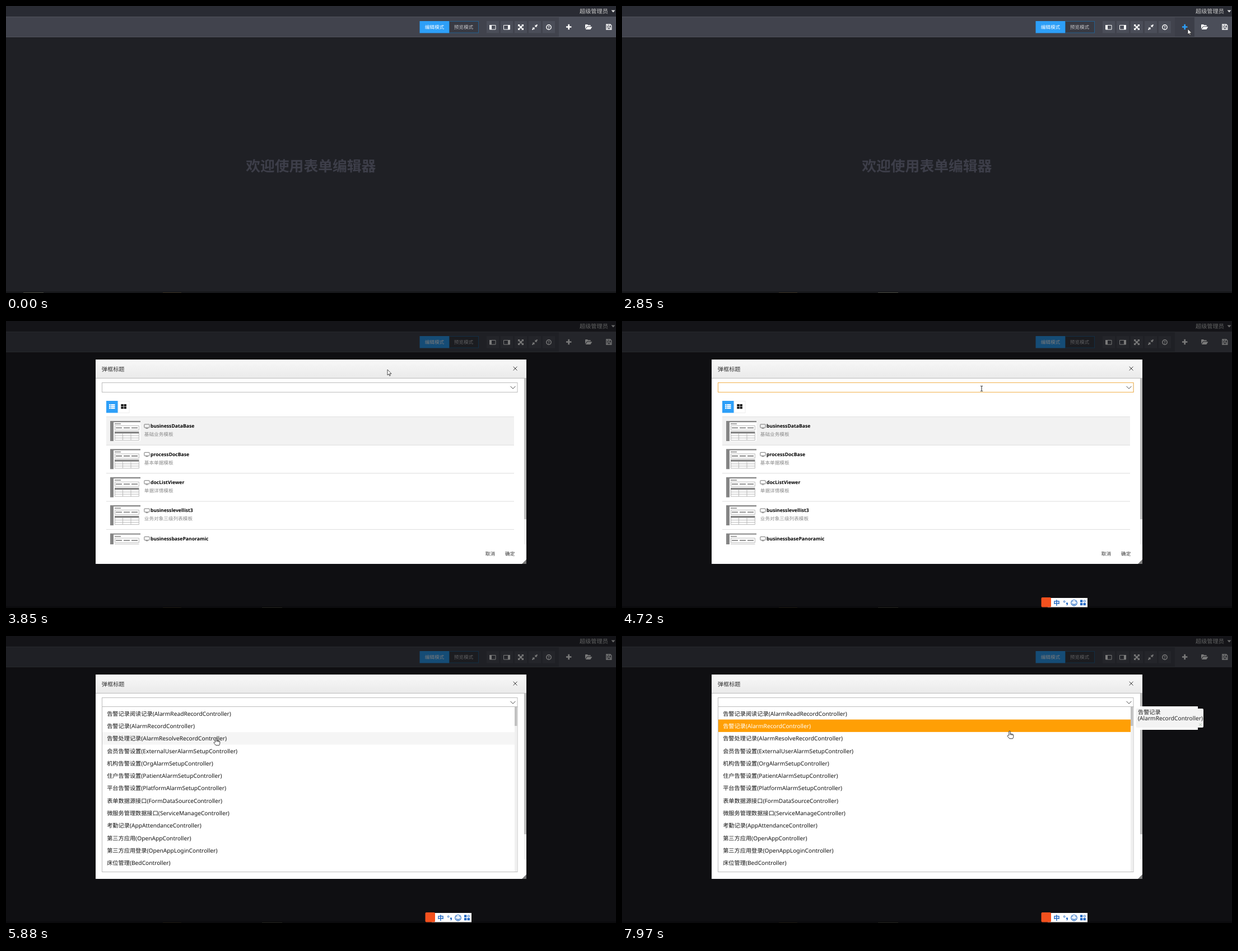
Write an HTML page that moves like this. It is 1089x514 px and loops after 8000 ms.

```html
<!DOCTYPE html>
<html lang="zh">
<head>
<meta charset="utf-8">
<title>表单编辑器</title>
<style>
html, body { margin: 0; width: 100%; height: 100%; overflow: hidden; background: #1f2025; }
svg { display: block; width: 100vw; height: 100vh; }
text { font: 10.2px "Noto Sans", "Noto Sans CJK SC", sans-serif; text-rendering: geometricPrecision; }
.small { font-size: 8.65px; }
.bold { font-weight: 700; }
.line { fill: none; stroke: #fff; }

/* Every timeline lasts 8 s, so 1% is 80 ms. */
.anim { animation: 8s step-end infinite; }
#cursor { animation-name: move; }
#arrow { animation-name: arrow; }
#ibeam { animation-name: ibeam; }
#hand { animation-name: hand; }
#taskA { animation-name: taskA; }
#taskB { animation-name: taskB; }
#plusBg { animation-name: plusBg; }
#plus { animation-name: plus; }
#shade { animation-name: shade; }
#modal { animation-name: modal; }
#focus { animation-name: focus; }
#caret { animation-name: caret; }
#menu { animation-name: menu; }
#hover { animation-name: hover; }
.picked { animation-name: picked; }
#ime { animation-name: ime; }

@keyframes move {
  0% { transform: translate(1200px, 600px); }
  1.625% { transform: translate(1047px, 468px); animation-timing-function: steps(3); }
  4.5% { transform: translate(967px, 114px); }
  7.375% { transform: translate(955px, 100px); animation-timing-function: steps(6); }
  13.25% { transform: translate(1012px, 43px); }
  31.875% { transform: translate(1012px, 43px); animation-timing-function: steps(3); }
  35.625% { transform: translate(1010px, 41px); }
  40% { transform: translate(1010px, 41px); animation-timing-function: steps(5); }
  45.375% { transform: translate(690px, 80px); }
  48.125% { transform: translate(681px, 87px); animation-timing-function: steps(6); }
  54.125% { transform: translate(637px, 118px); }
  57.875% { transform: translate(642px, 121px); }
  70.5% { transform: translate(600px, 134px); animation-timing-function: steps(3); }
  73.5% { transform: translate(375px, 182px); animation-timing-function: steps(6); }
  79.125% { transform: translate(295px, 169px); }
  98.625% { transform: translate(500px, 170px); }
  99.625%, 100% { transform: translate(692px, 170px); }
}
@keyframes arrow { 0% { opacity: 1; } 53.125%, 100% { opacity: 0; } }
@keyframes ibeam { 0% { opacity: 0; } 53.125% { opacity: 1; } 70.5%, 100% { opacity: 0; } }
@keyframes hand { 0% { opacity: 0; } 70.5%, 100% { opacity: 1; } }
@keyframes taskA { 0% { opacity: 1; } 31.875%, 100% { opacity: 0; } }
@keyframes taskB { 0% { opacity: 0; } 31.875%, 100% { opacity: 1; } }
@keyframes plusBg { 0% { opacity: 0; } 12.25% { opacity: 1; } 37.875%, 100% { opacity: 0; } }
@keyframes plus { 0% { stroke: #fff; } 12.25% { stroke: #2d9ff8; } 37.875%, 100% { stroke: #fff; } }
@keyframes shade {
  0% { opacity: 0; }
  37.875% { opacity: .24; animation-timing-function: linear; }
  41.5%, 100% { opacity: .52; }
}
@keyframes modal { 0% { opacity: 0; } 37.875%, 100% { opacity: 1; } }
@keyframes focus { 0% { opacity: 0; } 53.125% { opacity: 1; } 70.5%, 100% { opacity: 0; } }
@keyframes caret {
  0% { opacity: 0; } 61.875% { opacity: 1; } 67.625% { opacity: 0; } 74.375% { opacity: 1; }
  81.25% { opacity: 0; } 88% { opacity: 1; } 89.875%, 100% { opacity: 0; }
}
@keyframes menu { 0% { opacity: 0; } 61.875%, 100% { opacity: 1; } }
@keyframes hover {
  0% { opacity: 0; transform: none; }
  70.5% { opacity: 1; transform: none; }
  71.5% { opacity: 1; transform: translateY(22.3px); }
  73.5% { opacity: 1; transform: translateY(44.6px); }
  78.1875%, 100% { opacity: 1; transform: translateY(22.3px); }
}
@keyframes picked { 0% { opacity: 0; } 91.75%, 100% { opacity: 1; } }
@keyframes ime { 0% { opacity: 0; } 59% { opacity: 1; } 89.875% { opacity: 0; } 91.75%, 100% { opacity: 1; } }
</style>
</head>
<body>
<svg viewBox="0 0 1089 514">
  <defs>
    <linearGradient id="head" x2="0" y2="1"><stop stop-color="#f8f8f8"/><stop offset="1" stop-color="#eaeaea"/></linearGradient>
    <clipPath id="listClip"><path d="M160 165H925V400H160z"/></clipPath>
    <g id="thumb">
      <path fill="#fff" d="M186 179h54v36h-54z"/>
      <path fill="#858585" d="M186 179h54v2.2h-48V215h-6zM194 198h43.5v3.5H194zM194 183.5h11v1.5h-11zM196 190.5h11v1.8h-11zM210 190.5h11v1.8h-11zM224 190.5h11v1.8h-11z"/>
      <path fill="none" stroke="#aaa" stroke-width=".8" d="M194.4 187.5h43v8h-43zM194.4 201v12.5h43V201M194 205.5h43M194 209.5h43M208.5 201v12.5M223 201v12.5"/>
    </g>
    <path id="monitor" fill="none" stroke="#666" stroke-width=".9" d="M247.5 185h8q.6 0 .6.6v4.8q0 .6-.6.6h-8q-.6 0-.6-.6v-4.8q0-.6.6-.6zM249.5 192.4h4"/>
  </defs>

  <rect width="1089" height="514" fill="#1f2025"/>
  <rect width="1089" height="19.5" fill="#292b33"/>
  <rect y="20" width="1089" height="35" fill="#41434d"/>
  <path stroke="#50525b" d="M0 19.5H1089M0 55.5H1089"/>
  <text x="1024" y="12.9" fill="#cacaca">超级管理员</text>
  <path fill="#ddd" d="M1080.5 7.5h7l-3.5 4z"/>

  <rect x="738.5" y="27" width="52.5" height="21.5" fill="#2d9ff8"/>
  <rect x="791.5" y="27.5" width="52" height="20.5" fill="#383a43" stroke="#25608f"/>
  <text class="small" x="747.7" y="41.2" fill="#fff">编辑模式</text>
  <text class="small" x="799.7" y="41.2" fill="#c6c7cb">预览模式</text>
  <path fill="#4b4e59" d="M858 27h22v21.5h-22zM883 27h22v21.5h-22zM908 27h22v21.5h-22zM933 27h22v21.5h-22zM958 27h22v21.5h-22zM987 20h102v35H987z"/>
  <rect id="plusBg" class="anim" x="987" y="20" width="35" height="35" fill="#3c3e48"/>
  <g fill="#fff">
    <path class="line" d="M863.5 34.5h10.5v7.5h-10.5zM888.5 34.5h11v7.5h-11z"/>
    <path d="M863 34h4v8h-4zM896 34h4v8h-4z"/>
    <g transform="translate(919 38)">
      <path d="M-5-5h4l-4 4zM5-5v4l-4-4zM5 5h-4l4-4zM-5 5v-4l4 4z"/>
      <path class="line" stroke-width="2" d="M-3-3L3 3M3-3L-3 3"/>
    </g>
    <g transform="translate(944 38)">
      <path d="M.5-.5v-4l4 4zM-.5.5v4l-4-4z"/>
      <path class="line" stroke-width="2" d="M2-2L4.5-4.5M-2 2L-4.5 4.5"/>
    </g>
    <circle class="line" cx="969" cy="38" r="4.2" stroke-width="1.4"/>
    <text class="bold" x="969" y="40.6" text-anchor="middle" style="font-size:7px">?</text>
    <path id="plus" class="anim" transform="translate(1004.7 37.5)" stroke="#fff" stroke-width="2.6" d="M0-4.7V4.7M-4.7 0H4.7"/>
    <g transform="translate(1040 37.5)">
      <path d="M-6 3.5v-7q0-1 1-1h3l1.2 1.3h3.6q1 0 1 1v1h-5.5q-1 0-1.6.8z"/>
      <path d="M-5.2 4.5l2.4-4.1q.4-.6 1.2-.6h8l-2.7 4.1q-.4.6-1.2.6z"/>
    </g>
    <path class="line" stroke-width="1.3" transform="translate(1076.3 37.5)" d="M-4.5-4.5h7l2 2v7h-9zM-2.5-4.5v3h4v-3M-2.5 4.5v-3.3h5v3.3"/>
  </g>
  <text class="bold" x="544.3" y="295.6" text-anchor="middle" fill="#3d3e49" style="font-size:25.8px">欢迎使用表单编辑器</text>

  <rect y="511" width="1089" height="3" fill="#17181b"/>
  <rect x="280" y="513" width="33" height="1" fill="#3a3224"/>
  <rect id="taskA" class="anim" x="31" y="513" width="36" height="1" fill="#4a4b42"/>
  <rect id="taskB" class="anim" x="457" y="513" width="36" height="1" fill="#4a4b42"/>
  <rect id="shade" class="anim" width="1089" height="514"/>

  <g id="modal" class="anim">
    <rect x="160" y="69" width="769" height="366" fill="#fff"/>
    <rect x="160" y="69" width="769" height="33.5" fill="url(#head)"/>
    <path stroke="#bbb" d="M160 102.5H929"/>
    <text x="170.8" y="90" fill="#333">弹框标题</text>
    <path stroke="#333" d="M905.7 81.7l6.8 6.8m0-6.8l-6.8 6.8"/>
    <rect x="925" y="103" width="4" height="297" fill="#f0f0f0"/>
    <rect x="925" y="103" width="4" height="252" fill="#bdbdbd"/>
    <path fill="#777" d="M929 427v8h-8z"/>
    <rect x="171.5" y="110.5" width="741.5" height="17" fill="#fff" stroke="#bcbcbc"/>
    <rect id="focus" class="anim" x="171.5" y="110.5" width="741.5" height="17" fill="#fff" stroke="#f2b04a"/>
    <path fill="none" stroke="#444" d="M900.5 116.8l4.5 4.5 4.5-4.5"/>
    <rect x="179" y="143" width="21" height="21.5" fill="#2d9ff8"/>
    <rect x="200" y="143.5" width="20" height="21" fill="#fff" stroke="#eee"/>
    <path fill="#fff" d="M184 149h2.5v2.2H184zM184 152h2.5v2.2H184zM184 155h2.5v2.2H184zM187.3 149h7.2v2.2h-7.2zM187.3 152h7.2v2.2h-7.2zM187.3 155h7.2v2.2h-7.2z"/>
    <path fill="#111" d="M205.3 149h4.4v3.7h-4.4zM210.5 149h4.4v3.7h-4.4zM205.3 153.5h4.4v3.7h-4.4zM210.5 153.5h4.4v3.7h-4.4z"/>
    <rect x="179" y="172" width="728" height="50" fill="#f2f2f2"/>
    <path stroke="#e2e2e2" d="M179 171.5H907"/>
    <g id="templates" clip-path="url(#listClip)"></g>
    <text class="small" x="855.8" y="420.3" fill="#333">取消</text>
    <text class="small" x="891" y="420.3" fill="#333">确定</text>
  </g>

  <g id="menu" class="anim">
    <rect x="171.5" y="126.5" width="741.5" height="296" fill="#fff" stroke="#bcbcbc"/>
    <rect x="908" y="127" width="4.5" height="295" fill="#f0f0f0"/>
    <rect x="908" y="127" width="4.5" height="34" fill="#c1c1c1"/>
    <rect id="hover" class="anim" x="172" y="127.3" width="736" height="22.3" fill="#f5f5f5"/>
    <g id="options" fill="#151515"></g>
    <g class="anim picked">
      <rect x="172" y="149.6" width="736" height="22.3" fill="#ff9f05"/>
      <text x="180.2" y="164.9" fill="#fff">告警记录(AlarmRecordController)</text>
    </g>
  </g>
  <path id="caret" class="anim" stroke="#111" d="M176 113V124"/>

  <g class="anim picked">
    <rect x="916" y="126" width="112" height="42" fill="#fff"/>
    <rect x="917.5" y="130" width="120.5" height="34" rx="2" fill="#f3f3f3"/>
    <text x="921" y="139.8" fill="#222">告警记录</text>
    <text x="921" y="151.1" fill="#222">(AlarmRecordController)</text>
    <path stroke="#a9c3a9" stroke-width=".9" d="M1030.3 156.5l4.4 4.4m0-4.4l-4.4 4.4"/>
  </g>

  <g id="ime" class="anim">
    <rect x="760" y="496" width="71" height="16.5" fill="#fff"/>
    <rect x="748.5" y="495" width="17.5" height="17.5" rx="2" fill="#f4511e"/>
    <g fill="#1f66c1">
      <text class="bold" x="770.3" y="508.8" style="font-size:11.5px">中</text>
      <path d="M793 504.5h3v2.5q0 2-2.2 2.6l-.4-.8q1.1-.6 1.1-1.7H793z"/>
      <path d="M818 499.5h4.3v4.3H818zM818 505h4.3v4.3H818zM823.6 505h4.3v4.3h-4.3z"/>
    </g>
    <g fill="none" stroke="#1f66c1">
      <circle cx="789.7" cy="502.5" r="1.4"/>
      <circle cx="807" cy="504.7" r="5.2" stroke-width="1.2"/>
      <path stroke-width="1.2" d="M804 505.8q3 4 6 0M805 502v1.6M809 502v1.6"/>
      <circle cx="825.8" cy="501.7" r="1.7"/>
    </g>
  </g>

  <g id="cursor" class="anim">
    <path id="arrow" class="anim" fill="#fff" stroke="#222" stroke-width=".8" d="M0 0v10l2.3-2.1 1.5 3.4 1.5-.7-1.5-3.2h3.2z"/>
    <path id="ibeam" class="anim" fill="none" stroke="#222" d="M-2-4.5h1.5L0-4l.5-.5H2M0-4V4M-2 4.5h1.5L0 4l.5.5H2"/>
    <path id="hand" class="anim" fill="#fff" stroke="#222" stroke-width=".9" d="M-1.2 8V.8Q0-.6 1.2.8V5l4.6 1.1q1 .4 1 1.4v3q-.5 2-1.2 3.3H-.2L-3.8 9.5q-.4-1.6 1-1.6zM1.2 5v2.4M3.2 5.6v2M5 6.2v1.8"/>
  </g>
</svg>
<script>
const templates = [
  ['businessDataBase', '基础业务模板'],
  ['processDocBase', '基本单据模板'],
  ['docListViewer', '单据详情模板'],
  ['businesslevellist3', '业务对象三级列表模板'],
  ['businessbasePanoramic', '业务全景模板'],
];
const options = [
  '告警记录阅读记录(AlarmReadRecord', '告警记录(AlarmRecord', '告警处理记录(AlarmResolveRecord',
  '会员告警设置(ExternalUserAlarmSetup', '机构告警设置(OrgAlarmSetup', '住户告警设置(PatientAlarmSetup',
  '平台告警设置(PlatformAlarmSetup', '表单数据源接口(FormDataSource', '微服务管理数据接口(ServiceManage',
  '考勤记录(AppAttendance', '第三方应用(OpenApp', '第三方应用登录(OpenAppLogin', '床位管理(Bed',
];
const fill = (id, items, row) => document.getElementById(id).innerHTML = items.map(row).join('');

fill('templates', templates, ([name, note], i) => `
  <g transform="translate(0 ${i * 50.35})">
    <use href="#thumb"/><use href="#monitor"/>
    <text class="small bold" x="258" y="191.2">${name}</text>
    <text class="small" x="246.8" y="206.2" fill="#8a8a8a">${note}</text>
    <path stroke="#dcdcdc" d="M179 222.3H907"/>
  </g>`);
fill('options', options, (label, i) =>
  `<text x="180.2" y="${142.6 + i * 22.3}">${label}Controller)</text>`);
</script>
</body>
</html>
```
